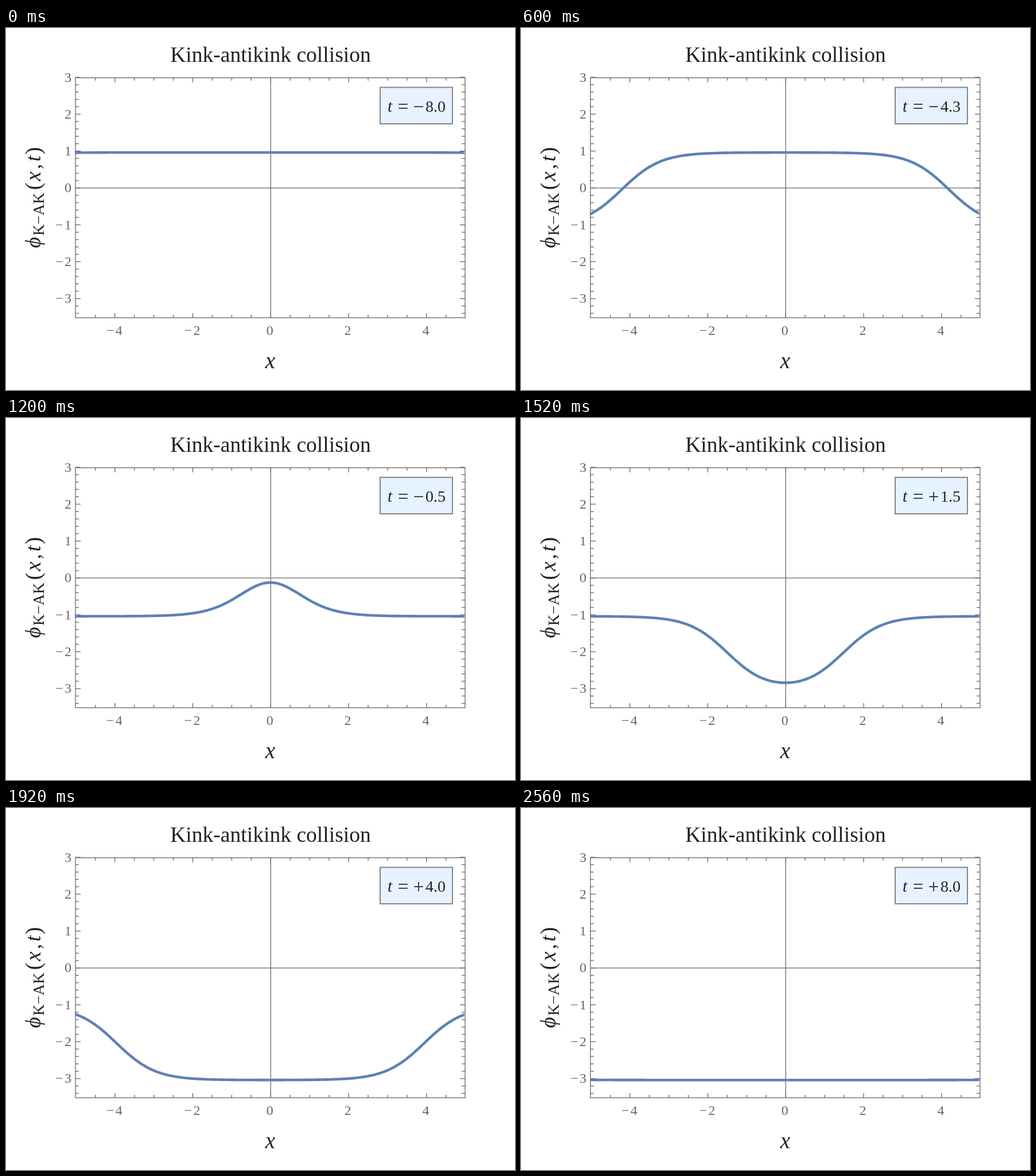
Recreate the animation shown at these times as an HTML page with a canvas. Size 887 by 631 pixels, loop 2600 ms.

```html
<!DOCTYPE html>
<html lang="en">
<head>
<meta charset="utf-8">
<title>Kink-antikink collision</title>
<style>
  html, body { margin: 0; width: 100%; height: 100%; overflow: hidden; background: #fff; }
  canvas { display: block; }
</style>
</head>
<body>
<canvas id="stage" width="887" height="631"></canvas>
<script>
const ctx = document.getElementById('stage').getContext('2d');

const STEP_MS = 40, STEPS = 65;
const SPEED = 0.987;
const FRAME = { left: 121, right: 800, top: 86.7, bottom: 505 };
const GRAY = '#666', INK = '#222', BLUE = '#5e81b5';
const SERIF = '"Liberation Serif", "Times New Roman", serif';

const toX = x => 461.3 + 67.9 * x;
const toY = y => 278.8 - 64.3 * y;

function text(str, x, y, size, { align = 'center', italic = false, color = INK } = {}) {
  ctx.font = `${italic ? 'italic ' : ''}${size}px ${SERIF}`;
  ctx.textAlign = align;
  ctx.fillStyle = color;
  ctx.fillText(str, x, y);
}

function line(x1, y1, x2, y2) {
  ctx.beginPath();
  ctx.moveTo(x1, y1);
  ctx.lineTo(x2, y2);
  ctx.stroke();
}

function tickLabel(value, x, y) {
  text(Math.abs(value), x, y, 24, { color: GRAY });
  if (value < 0) text('−', x - 15, y, 24, { color: GRAY });
}

function drawAxes() {
  const { left, right, top, bottom } = FRAME;
  ctx.strokeStyle = GRAY;
  ctx.lineWidth = 1.3;
  ctx.strokeRect(left, top, right - left, bottom - top);
  line(left, toY(0), right, toY(0));
  line(toX(0), top, toX(0), bottom);

  for (let i = -9; i <= 9; i++) {
    const x = toX(i / 2), major = i % 4 === 0, len = major ? 8 : 5;
    line(x, top, x, top + len);
    line(x, bottom, x, bottom - len);
    if (major) tickLabel(i / 2, x + (i < 0 ? 7 : -1.5), 534.5);
  }
  for (let i = -17; i <= 15; i++) {
    const y = toY(i / 5), major = i % 5 === 0, len = major ? 9 : 6;
    line(left, y, left + len, y);
    line(right, y, right - len, y);
    if (major) tickLabel(i / 5, 108, y + 7.6);
  }
}

function drawLabels() {
  text('Kink-antikink collision', 461, 59, 37.6);
  text('x', 460.5, 593, 39, { italic: true });

  ctx.save();
  ctx.translate(59.5, 0);
  ctx.rotate(-Math.PI / 2);
  text('ϕ', -374, 0, 37, { italic: true });
  text('K−AK', -324.5, 6.5, 27.5);
  text('(', -276, 0, 38);
  text('x', -258.5, 0, 38, { italic: true });
  text(',', -241.5, 0, 36);
  text('t', -227.5, 0, 38, { italic: true });
  text(')', -214, 0, 38);
  ctx.restore();
}

function drawClock(t) {
  ctx.fillStyle = '#e6f2ff';
  ctx.strokeStyle = '#808688';
  ctx.lineWidth = 2;
  ctx.fillRect(652, 103.5, 126, 63.5);
  ctx.strokeRect(652, 103.5, 126, 63.5);
  text('t', 665, 146, 29, { align: 'left', italic: true });
  text('=', 692, 147.5, 33);
  text(t < 0 ? '−' : '+', 719, 147.5, 33);
  text(Math.abs(t).toFixed(1), 766, 146, 28, { align: 'right' });
}

// Superposition of a kink and an antikink moving through each other
function field(x, t) {
  const shift = SPEED * t;
  return Math.tanh(x - shift) - Math.tanh(x + shift) - 1;
}

function drawCurve(t) {
  ctx.save();
  ctx.beginPath();
  ctx.rect(120.3, FRAME.top, 678.3, FRAME.bottom - FRAME.top);
  ctx.clip();
  ctx.beginPath();
  for (let x = -5.1; x <= 5.1; x += 0.03) {
    ctx.lineTo(toX(x) - 0.6, toY(field(x, t)) + 2.5);
  }
  ctx.strokeStyle = BLUE;
  ctx.lineWidth = 4.6;
  ctx.lineJoin = 'round';
  ctx.stroke();
  ctx.restore();
}

function draw() {
  const step = Math.floor(performance.now() / STEP_MS) % STEPS;
  const t = -8 + step / 4;
  ctx.fillStyle = '#fff';
  ctx.fillRect(0, 0, 887, 631);
  drawAxes();
  drawLabels();
  drawCurve(t);
  drawClock(t);
  requestAnimationFrame(draw);
}
draw();
</script>
</body>
</html>
```
